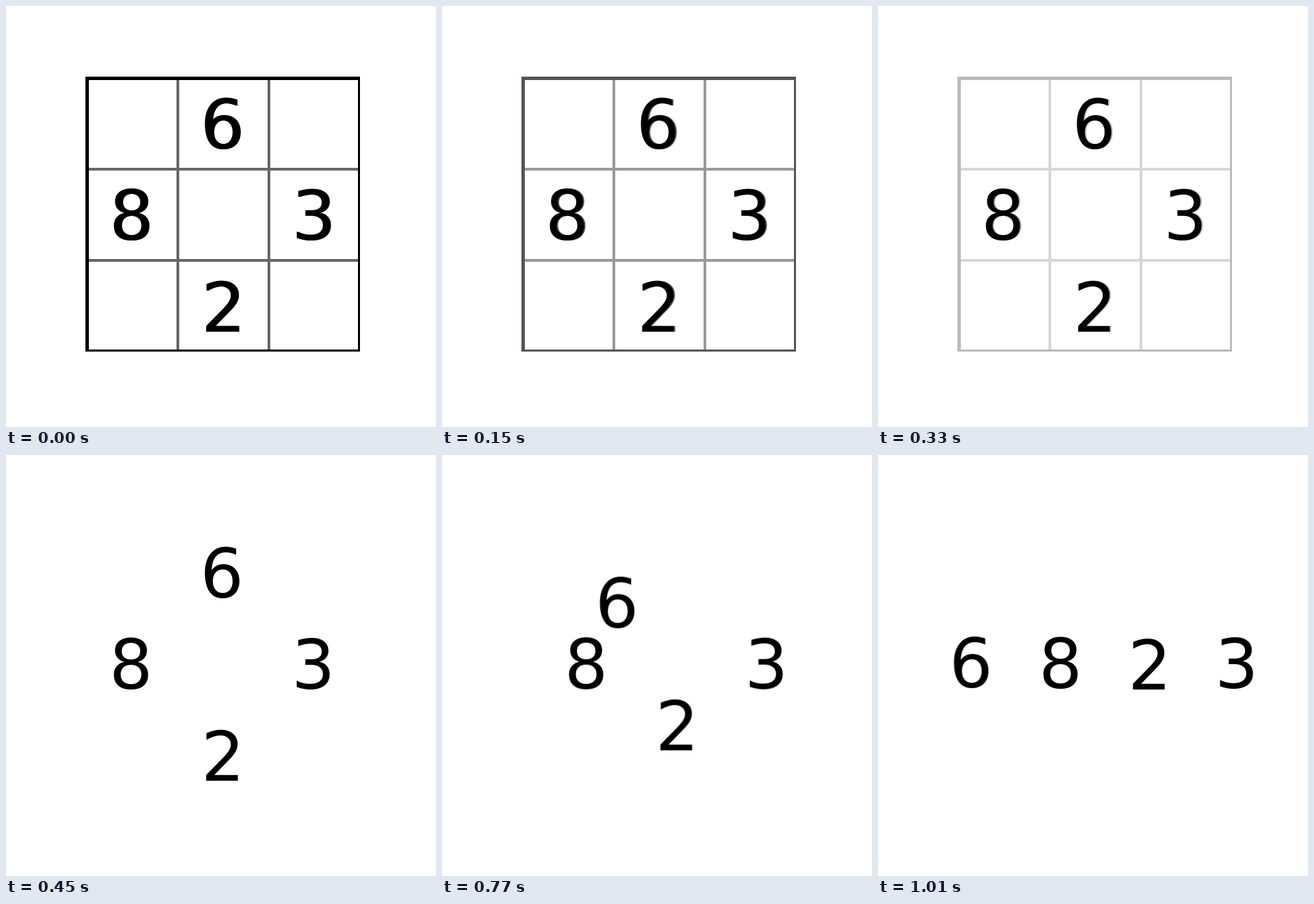
Write an HTML page that moves like this. It is 628 by 614 pixels and loops after 1210 ms.

```html
<!DOCTYPE html>
<html lang="en">
<head>
<meta charset="utf-8">
<title>Four digits</title>
<style>
  html, body { margin: 0; width: 100%; height: 100%; overflow: hidden; background: #fff; }
  svg { display: block; width: 628px; height: 614px; }
  text { font: 100px Verdana, "DejaVu Sans", sans-serif; text-anchor: middle; }

  /* The 1 ms lead keeps each step safely inside its own interval. */
  .grid, .digit { animation: 1210ms -1ms infinite; }
  .grid { animation-name: fade; }
  .digit { animation-name: line-up; }

  /* 15 steps over 0–450 ms */
  @keyframes fade {
    0% { opacity: 1; animation-timing-function: steps(15, end); }
    37.1901%, 100% { opacity: 0; }
  }
  /* 12 steps over 650–1010 ms */
  @keyframes line-up {
    0%, 53.719% { transform: translate(0, 0); animation-timing-function: steps(12, end); }
    83.4711%, 100% { transform: translate(var(--dx), var(--dy)); }
  }
</style>
</head>
<body>
<svg viewBox="0 0 628 614">
  <g class="grid">
    <path fill="#666" d="M249 103h4v401h-4zM382 103h4v401h-4zM116 236h401v4h-401zM116 369h401v4h-401z"/>
    <path fill-rule="evenodd" d="M116 103h401v401h-401zM121 108v393h393v-393z"/>
    <!-- printed digits sit slightly right of the moving ones -->
    <g transform="translate(2 0)">
      <text x="315.2" y="208">6</text>
      <text x="182.6" y="340.5">8</text>
      <text x="316.8" y="474.5">2</text>
      <text x="448.7" y="341">3</text>
    </g>
  </g>
  <text class="digit" x="315.2" y="208" style="--dx: -179.5px; --dy: 131px">6</text>
  <text class="digit" x="182.6" y="340.5" style="--dx: 84px; --dy: -1px">8</text>
  <text class="digit" x="316.8" y="474.5" style="--dx: 80px; --dy: -133px">2</text>
  <text class="digit" x="448.7" y="341" style="--dx: 75px; --dy: -1px">3</text>
</svg>
</body>
</html>
```
